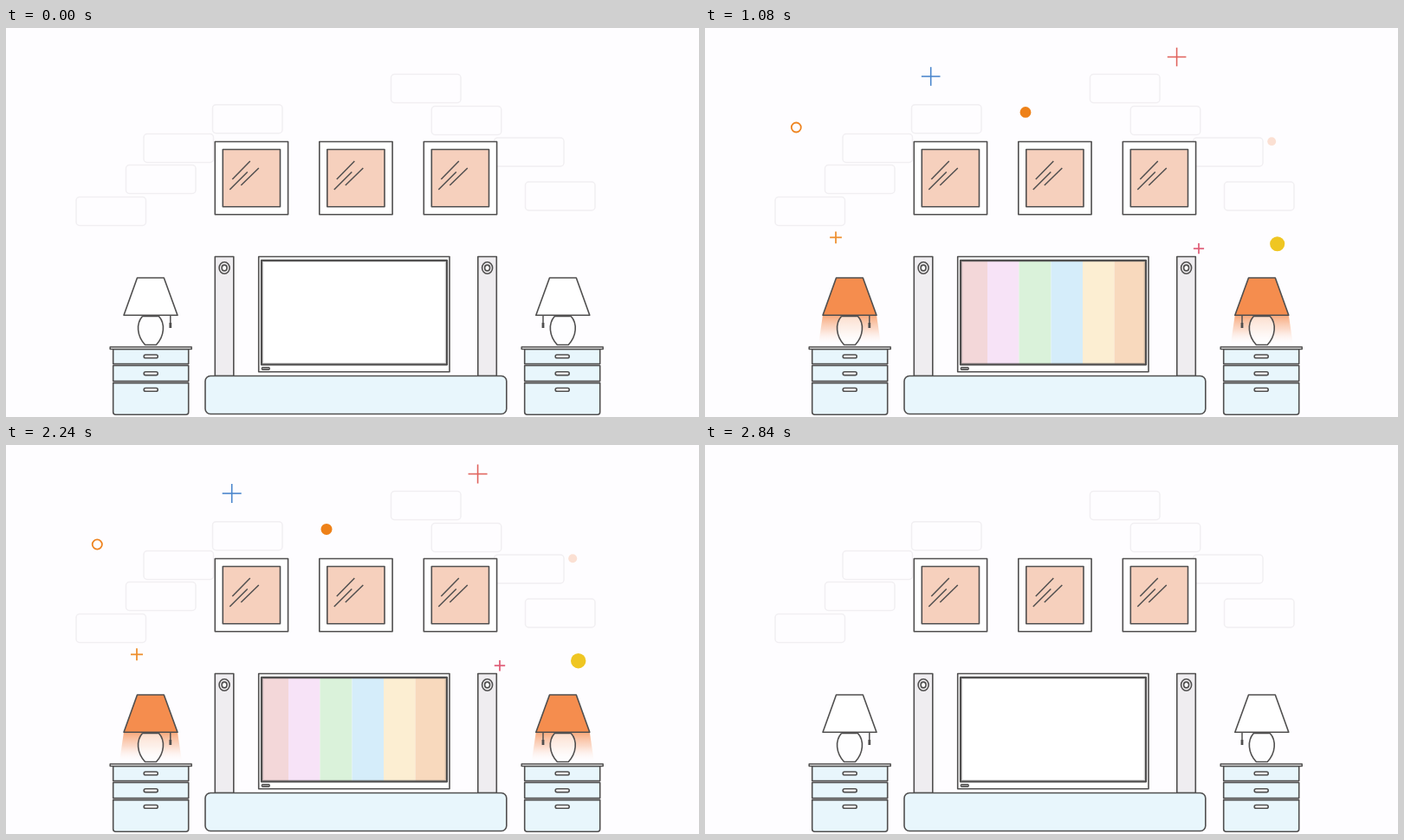
These frames come from a looping animation (800 by 450 pixels, 3.36 s). An HTML page with a canvas:

```html
<!DOCTYPE html>
<html lang="en">
<head>
<meta charset="utf-8">
<title>Living room</title>
<style>
html, body { margin: 0; width: 100%; height: 100%; overflow: hidden; background: #fefdff; }
canvas { display: block; width: 800px; height: 450px; }
</style>
</head>
<body>
<canvas id="stage" width="800" height="450"></canvas>
<script>
const ctx = document.getElementById('stage').getContext('2d');
const LOOP = 3360, STEP = 40;
const INK = '#504f4f', WALL = '#fefdff', BLUE = '#e8f6fc';
const clamp = v => Math.max(0, Math.min(1, v));

function paint(fill, stroke, width = 1.6) {
  if (fill) { ctx.fillStyle = fill; ctx.fill(); }
  if (stroke) { ctx.strokeStyle = stroke; ctx.lineWidth = width; ctx.stroke(); }
}

// Rectangle given by its left, top, right and bottom edges
function box(l, t, r, b, fill, stroke, radius = 0, width) {
  ctx.beginPath();
  ctx.roundRect(l, t, r - l, b - t, radius);
  paint(fill, stroke, width);
}

function poly(points, fill, stroke) {
  ctx.beginPath();
  points.forEach(([x, y]) => ctx.lineTo(x, y));
  ctx.closePath();
  paint(fill, stroke);
}

function line(x1, y1, x2, y2, color, width) {
  ctx.beginPath();
  ctx.moveTo(x1, y1);
  ctx.lineTo(x2, y2);
  paint(null, color, width);
}

function oval(x, y, rx, ry, fill, stroke, width) {
  ctx.beginPath();
  ctx.ellipse(x, y, rx, ry, 0, 0, Math.PI * 2);
  paint(fill, stroke, width);
}

function faded(alpha, draw) {
  if (alpha <= 0) return;
  ctx.save();
  ctx.globalAlpha = alpha;
  draw();
  ctx.restore();
}

function elastic(t) {
  if (t <= 0) return 0;
  if (t >= 1) return 1;
  return 1 + 2 ** (-10 * t) * Math.sin((t - 0.075) * Math.PI * 2 / 0.3);
}

const bricks = [[81, 195.5], [138.5, 158.5], [159, 122.5], [238.5, 88.7],
  [444.5, 53.5], [491.3, 90.5], [563.5, 127], [599.5, 178]];

const stripes = ['#f3d7d9', '#f7e3f7', '#daf2da', '#d5edfa', '#fceed2', '#f8d9bd'];
const edges = [294.5, 326, 362.5, 399.5, 436, 472.5, 509.5];

const icons = [
  { kind: 'ring', x: 105.3, y: 115, r: 5.6, w: 1.8, color: '#ee8420' },
  { kind: 'plus', x: 260.7, y: 56, r: 11, w: 1.6, color: '#4a86cc' },
  { kind: 'plus', x: 544.6, y: 33.5, r: 11, w: 1.6, color: '#e0645e' },
  { kind: 'dot', x: 370, y: 97.4, r: 6.5, color: '#ee8118' },
  { kind: 'dot', x: 654.2, y: 131.2, r: 5, color: '#fbe0d3' },
  { kind: 'plus', x: 151, y: 242.3, r: 7, w: 1.8, color: '#ee9030' },
  { kind: 'plus', x: 570, y: 255.2, r: 6.2, w: 1.8, color: '#e0607a' },
  { kind: 'dot', x: 660.7, y: 249.7, r: 8.7, color: '#efc622' }
];

function icon({ kind, x, y, r, w, color }, scale) {
  ctx.save();
  ctx.translate(x, y);
  ctx.scale(scale, scale);
  if (kind === 'dot') oval(0, 0, r, r, color);
  if (kind === 'ring') oval(0, 0, r, r, null, color, w);
  if (kind === 'plus') {
    line(-r, 0, r, 0, color, w);
    line(0, -r, 0, r, color, w);
  }
  ctx.restore();
}

function picture(x) {
  box(x, 131.5, x + 84.3, 215.7, '#fff', INK);
  box(x + 9, 140.5, x + 75.2, 206.7, '#f6d0bd', INK);
  line(x + 20, 175, x + 40.5, 154, INK, 1.5);
  line(x + 17, 187, x + 37.5, 166.5, INK, 1.5);
  line(x + 30, 182, x + 50.5, 162, INK, 1.5);
}

function speaker(x) {
  box(x, 264.5, x + 21.5, 402.5, '#efedf0', INK);
  oval(x + 10.8, 277.5, 6, 6.8, '#f6f4f6', INK);
  oval(x + 10.8, 277.5, 3, 3.4, '#fff', INK);
}

function tv(on) {
  box(291.7, 264.5, 512, 397.8, '#fff', INK);
  faded(on, () => stripes.forEach((color, i) =>
    box(edges[i], 268.5, edges[i + 1], 389.5, color)));
  box(296.3, 270, 507.7, 388, null, 'rgba(80,79,79,.22)', 0, 2);
  box(295, 268.8, 509, 389.4, null, INK, 0, 2.2);
  box(295.3, 392.5, 304.3, 395.3, '#8a8989', INK, 1, 1.2);
}

function cabinet(x) {
  box(x + 3.5, 371.5, x + 90.5, 388.6, BLUE, INK);
  box(x + 3.5, 390.5, x + 90.5, 408.6, BLUE, INK);
  box(x + 3.5, 410.6, x + 90.5, 447.3, BLUE, INK, [0, 0, 3, 3]);
  box(x, 369, x + 94, 371.6, '#fff', INK, 0, 1.5);
  for (const y of [378, 397.8, 416.5])
    box(x + 39, y, x + 55, y + 3.8, '#fff', INK, 2);
}

function lamp(on, glow) {
  faded(glow, () => {
    const g = ctx.createLinearGradient(0, 332, 0, 365);
    g.addColorStop(0, 'rgba(246,150,95,.85)');
    g.addColorStop(0.5, 'rgba(249,185,150,.5)');
    g.addColorStop(1, 'rgba(255,235,225,0)');
    poly([[136, 332], [198, 332], [203, 366], [131, 366]], g);
  });
  ctx.beginPath();
  ctx.moveTo(157.5, 333.5);
  ctx.lineTo(176.5, 333.5);
  ctx.bezierCurveTo(184, 342, 183, 356, 173.5, 366.5);
  ctx.lineTo(160.5, 366.5);
  ctx.bezierCurveTo(151, 356, 150, 342, 157.5, 333.5);
  paint('rgba(255,255,255,.6)', INK);
  line(189.8, 332, 189.8, 347, INK, 1.5);
  line(189.8, 341, 189.8, 347, INK, 2.8);
  const shade = [[151.5, 289], [182.3, 289], [198, 332.2], [136, 332.2]];
  poly(shade, '#fff');
  faded(on, () => poly(shade, '#f58d4e'));
  poly(shade, null, INK);
}

function draw(t) {
  const lit = t >= 560 && t < 2840;
  const out = clamp((2840 - t) / 420);
  const on = lit ? clamp((t - 520) / 80) * out : 0;
  const glow = lit ? clamp((t - 560) / 200) * out : 0;

  ctx.globalAlpha = 1;
  ctx.lineJoin = 'round';
  ctx.fillStyle = WALL;
  ctx.fillRect(0, 0, 800, 450);

  bricks.forEach(([x, y]) => box(x, y, x + 80.5, y + 33, null, '#f1eff2', 4, 1.5));
  [241.3, 361.8, 482.3].forEach(picture);
  [241.3, 544.8].forEach(speaker);
  tv(on);
  box(230, 402.5, 577.8, 446.5, BLUE, INK, 6);
  [120.2, 595.2].forEach(cabinet);

  lamp(on, glow);
  ctx.save();
  ctx.translate(809.8, 0);
  ctx.scale(-1, 1);
  lamp(on, glow);
  ctx.restore();

  if (lit) {
    const scale = elastic((t - 496) / 1600);
    faded(out, () => icons.forEach(i => icon(i, scale)));
  }
}

let start;
function tick(now) {
  start ??= now;
  const t = (now - start) % LOOP;
  draw(Math.floor(t / STEP) * STEP);
  requestAnimationFrame(tick);
}
draw(0);
requestAnimationFrame(tick);
</script>
</body>
</html>
```
